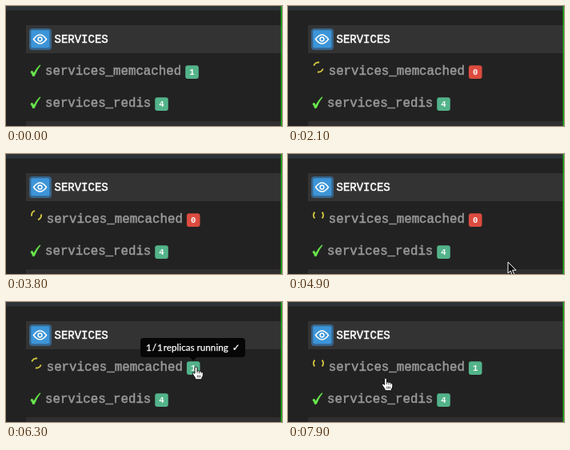
An HTML page that plays this animation: 345x150 px, repeating every 8000 ms.

```html
<!DOCTYPE html>
<html lang="en">
<head>
<meta charset="utf-8">
<title>Services</title>
<style>
  html, body { margin: 0; width: 100%; height: 100%; overflow: hidden; background: #222; }
  svg { display: block; width: 345px; height: 150px; }
  text { white-space: pre; }
  .mono { font-family: "Courier Prime", "Liberation Mono", monospace; }
  .title { font-size: 14px; fill: #fff; stroke: #fff; stroke-width: .5; }
  .name { font-size: 15.75px; fill: #999; stroke: #999; stroke-width: .5; }
  .count { font-size: 10.5px; font-weight: 700; fill: #fff; text-anchor: middle; }
  .tip { font: 11.7px Lato, "DejaVu Sans", sans-serif; fill: #fff; stroke: #fff; stroke-width: .25; }
  .ratio { letter-spacing: -1px; }
</style>
</head>
<body>
<svg viewBox="0 0 345 150">
  <defs>
    <path id="check" d="M30.7 82.4L32.6 80.8Q33.9 82 34.6 84Q37.6 78 42.2 73.7L43.2 74.1Q38.4 80 35.6 87.6L33.6 88Q32.4 84.6 30.7 82.4Z" fill="#69e94c" stroke="#69e94c" stroke-width=".4"/>
  </defs>

  <rect width="345" height="150" fill="#222"/>
  <rect width="345" height="5" fill="#2d3339"/>
  <rect y="5" width="345" height="1" fill="#282b2d"/>
  <rect x="25" y="24" width="320" height="35" fill="#333"/>
  <rect x="25" y="144" width="320" height="6" fill="#302e2f"/>
  <rect x="343.6" width="1.4" height="150" fill="#1db01d"/>

  <rect x="29" y="28" width="28" height="27" rx="4" fill="#36658c"/>
  <rect x="31.3" y="30.3" width="23" height="22" rx="2" fill="#3d95d8"/>
  <g fill="none" stroke="#fff" stroke-width="1.5">
    <path d="M34.5 41.5Q42.5 30.5 50.5 41.5Q42.5 52.5 34.5 41.5Z"/>
    <circle cx="42.5" cy="41.5" r="2.4"/>
  </g>
  <text class="mono title" x="60.5" y="46">SERVICES</text>

  <use id="ready" href="#check"/>
  <path id="spinner" d="M-4.6-3.9A6 6 0 0 0-4.6 3.9M4.6-3.9A6 6 0 0 1 4.6 3.9" fill="none" stroke="#d2c640" stroke-width="2"/>
  <g id="service">
    <text class="mono name" x="49" y="86">services_memcached</text>
    <rect id="badge" x="224.2" y="74.3" width="16.6" height="16.6" rx="3"/>
    <text id="count" class="mono count" x="232.5" y="86"></text>
  </g>

  <use href="#check" y="40"/>
  <text class="mono name" x="49" y="126">services_redis</text>
  <rect x="186.2" y="114.3" width="16.6" height="16.6" rx="3" fill="#53b38a"/>
  <text class="mono count" x="194.5" y="126">4</text>

  <g id="tooltip">
    <path d="M172 45H295Q299 45 299 49V65Q299 69 295 69H238.5L234 73.5L229.5 69H172Q168 69 168 65V49Q168 45 172 45Z" fill="#060606"/>
    <text class="tip" x="175" y="61"><tspan class="ratio">1 / 1 </tspan>replicas running <tspan dx="2">✓</tspan></text>
  </g>

  <path id="arrow" d="M0 0V14L3.2 11L5.2 16L7.6 15L5.5 10.2H10Z" fill="#000" stroke="#fff"/>
  <g id="hand" stroke="#000" stroke-width=".9" stroke-linejoin="round">
    <path d="M-1.5 1.5Q0-.5 1.5 1.5V6Q3 4.6 4 6.2Q5.6 5.2 6.4 6.8Q8.6 6.2 8.8 8.5V11Q8.6 13 7.3 14.3V16.3H-.8V15Q-2 12.5-4.3 9.5Q-5 7.6-3 7.6L-1.5 9Z" fill="#fff"/>
    <path d="M1.5 6V8.5M4 6.5V9M6.4 7V9M1.8 11V14M3.6 11V14M5.4 11V14" fill="none" stroke-width=".7"/>
  </g>
</svg>
<script>
const LOOP = 8000, STEP = 100;
const RESTART = 500, RUNNING = 5500;
const CURSOR_IN = 4700, OVER_LINK = 6000;

// Each key: time, x, y
const cursorPath = [
  [4700, 287, 41], [4800, 281, 96], [4900, 275, 135], [5200, 266, 129],
  [5800, 264, 127], [6100, 238, 82], [6300, 237.5, 80.5], [7000, 237, 80.5],
  [7300, 193, 91.5], [7600, 122.5, 94], [7900, 122, 94.5]
];
const tipFade = [[5900, 0], [6200, 1], [7100, 1], [7300, 0.36], [7500, 0]];

const el = id => document.getElementById(id);
const show = (id, on) => el(id).setAttribute("visibility", on ? "visible" : "hidden");
const move = (id, x, y, turn = 0) =>
  el(id).setAttribute("transform", `translate(${x} ${y}) rotate(${turn})`);

function sample(keys, t) {
  if (t <= keys[0][0]) return keys[0].slice(1);
  const i = keys.findIndex(key => key[0] > t);
  if (i < 0) return keys[keys.length - 1].slice(1);
  const a = keys[i - 1], b = keys[i], p = (t - a[0]) / (b[0] - a[0]);
  return a.slice(1).map((v, k) => v + (b[k + 1] - v) * p);
}

function draw(t) {
  const busy = t >= RESTART;
  const down = busy && t < RUNNING;
  show("ready", !busy);
  show("spinner", busy);
  move("spinner", 38, 76.5, (t - 4900) / 1200 * 360);
  move("service", busy ? 1.7 : 0, 0);
  el("badge").setAttribute("fill", down ? "#dc4b3f" : "#53b38a");
  el("count").textContent = down ? "0" : "1";

  el("tooltip").setAttribute("opacity", sample(tipFade, t)[0]);
  const [x, y] = sample(cursorPath, t);
  move("arrow", x, y);
  move("hand", x, y);
  show("arrow", t >= CURSOR_IN && t < OVER_LINK);
  show("hand", t >= OVER_LINK);
}

const start = performance.now();
function tick() {
  const t = (performance.now() - start) % LOOP;
  draw(Math.floor(t / STEP) * STEP);
  requestAnimationFrame(tick);
}
tick();
</script>
</body>
</html>
```
